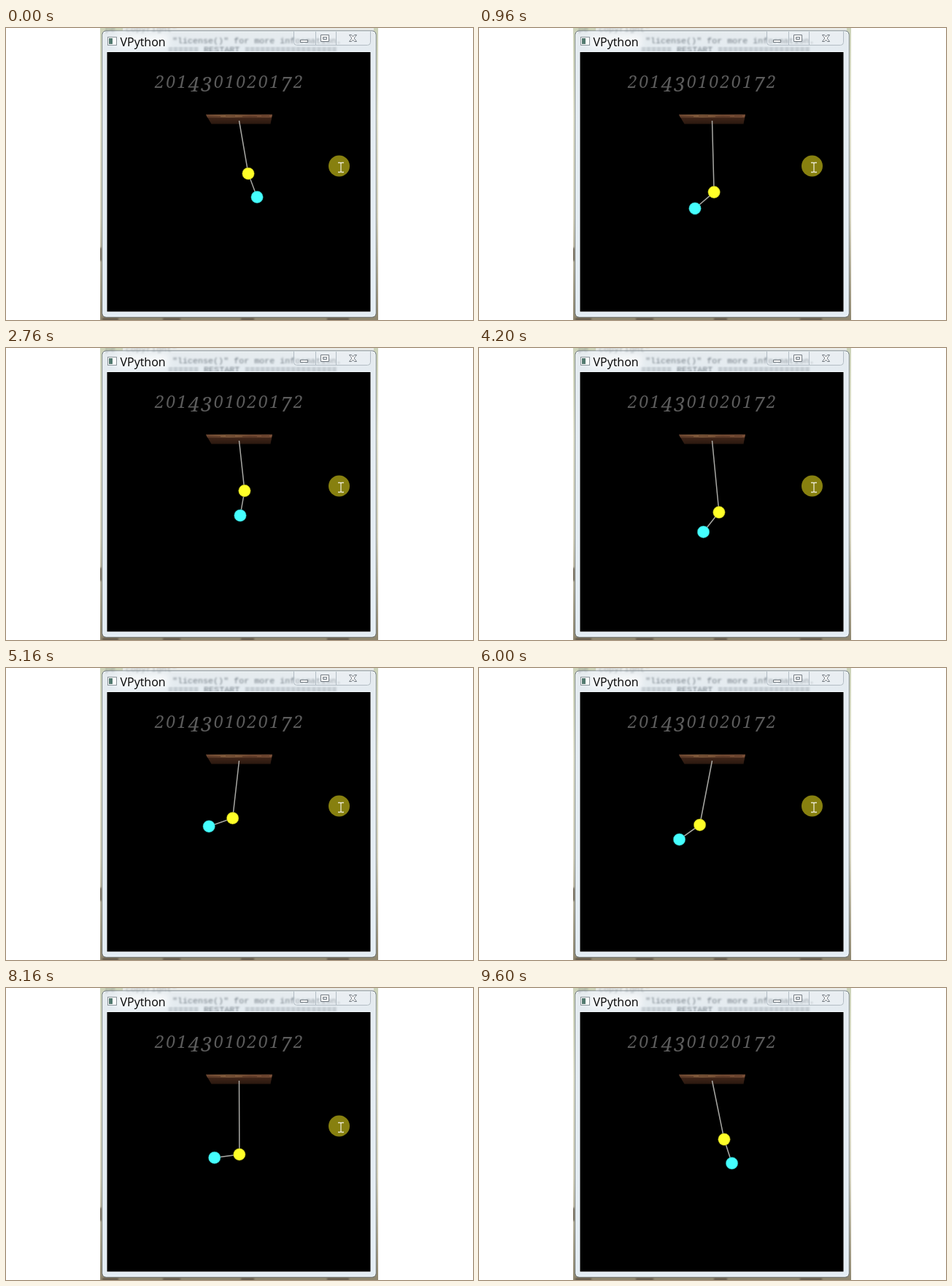
An HTML page that plays this animation: 640 by 400 pixels, repeating every 9.72 s.

```html
<!DOCTYPE html>
<html lang="en">
<head>
<meta charset="utf-8">
<title>Elastic double pendulum</title>
<style>
  html, body { margin: 0; width: 100%; height: 100%; overflow: hidden; background: #fff; }
  svg { display: block; }
  .shell { font: 11.7px "Liberation Mono", monospace; fill: #727c84; filter: url(#blur); }
  .title { font: 16px "Open Sans", sans-serif; }
  .label { font: italic 23px "Noto Serif", serif; letter-spacing: 2.4px; fill: #5c5c5c; }
  .tall { font-size: 27px; }
</style>
</head>
<body>
<svg width="640" height="400" viewBox="0 0 640 400">
  <defs>
    <filter id="blur"><feGaussianBlur stdDeviation="1.1"/></filter>
    <filter id="glow" x="-30%" y="-80%" width="160%" height="260%"><feGaussianBlur stdDeviation="5"/></filter>
    <linearGradient id="desk" x2="0" y2="1">
      <stop offset="0" stop-color="#ccd2b8"/>
      <stop offset=".3" stop-color="#e2e2cf"/>
      <stop offset=".65" stop-color="#d3d1bd"/>
      <stop offset="1" stop-color="#8f8770"/>
    </linearGradient>
    <linearGradient id="frame" x2="0" y2="1">
      <stop offset="0" stop-color="#e6ebee"/>
      <stop offset=".08" stop-color="#e3ebf1"/>
      <stop offset="1" stop-color="#e3edf4"/>
    </linearGradient>
    <linearGradient id="edge" x2="1" y2="0">
      <stop offset="0" stop-color="#6b452f"/>
      <stop offset=".35" stop-color="#86603f"/>
      <stop offset=".65" stop-color="#6e4730"/>
      <stop offset="1" stop-color="#7c5138"/>
    </linearGradient>
    <linearGradient id="under" x2="0" y2="1">
      <stop offset="0" stop-color="#4a2b1d"/>
      <stop offset="1" stop-color="#2a180f"/>
    </linearGradient>
    <clipPath id="scene"><rect x="129" width="381" height="400"/></clipPath>
  </defs>

  <g clip-path="url(#scene)">
    <rect x="129" width="381" height="400" fill="url(#desk)"/>
    <rect x="160" width="344" height="6" fill="#e9ebe8"/>
    <path d="M129 301v18M132 399h22M215 399h24M322 399h18M440 399h30" stroke="#5b5144" stroke-width="3" filter="url(#blur)"/>

    <rect x="132" y="4" width="375" height="392" rx="5" fill="url(#frame)" stroke="#5f6a72"/>
    <rect x="133" y="5" width="373" height="390" rx="4" fill="none" stroke="#f4f9fc"/>
    <text class="shell" x="136" y="5" fill-opacity=".6">pe "copyright"</text>
    <text class="shell" x="228" y="21">"license()" for more information.</text>
    <text class="shell" x="222" y="33">====== RESTART ==================</text>
    <rect x="152" y="9" width="70" height="19" fill="#fff" fill-opacity=".7" filter="url(#glow)"/>

    <rect x="139.5" y="12.5" width="12" height="11" fill="#fff" stroke="#8b949a"/>
    <rect x="141" y="14" width="5" height="8" fill="#52796f"/>
    <text class="title" x="156.5" y="24.5">VPython</text>

    <path d="M394.5 4.5v15q0 4 4 4h97q4 0 4-4v-15M424.5 5v18M452.5 5v18" fill="#f3f7fa" fill-opacity=".25" stroke="#b2bcc4"/>
    <g fill="#fff" stroke="#717980">
      <rect x="403.5" y="16.5" width="10" height="3"/>
      <path d="M431.5 9.5h11v9h-11zM434.5 12.5h5v3h-5z" fill-rule="evenodd"/>
      <path d="M470.5 9.5h3l2 2.5 2-2.5h3l-3.5 4.5 3.5 4.5h-3l-2-2.5-2 2.5h-3l3.5-4.5z"/>
    </g>

    <rect x="138" y="32.5" width="362" height="356.5" fill="#000" stroke="#f1f6f9"/>
    <text class="label" id="label" x="204" y="82"></text>

    <path d="M274 119h91l-2.500 12.500h-81z" fill="url(#under)"/>
    <path d="M274 118.500h91l-1 4h-88z" fill="url(#edge)"/>
    <path d="M276 121.500h18M301 120.500h13M324 121.500h20M350 120.500h11" stroke="#523222" stroke-width=".8"/>

    <polyline id="rods" fill="none" stroke="#a8a8a4" stroke-width="1.5"/>
    <circle id="upper" r="8.3" fill="#ffff28" stroke="#777710" stroke-width=".5"/>
    <circle id="lower" r="8.3" fill="#45ffff" stroke="#187777" stroke-width=".5"/>

    <g id="pointer">
      <circle cx="456.5" cy="189" r="14.5" fill="#87800f"/>
      <path d="M455 184.500h3l1 1 1-1h3M459 185v12M455 197.500h3l1-1 1 1h3" fill="none" stroke="#e8e5cf" stroke-width="1.3"/>
    </g>
  </g>
</svg>
<script>
const LOOP = 9720, STEP = 120;
const POINTER_LEAVES = 9.48;
const PIVOT = { x: 319.5, y: 127 }, ROD = 34.4;

// time (s), spring angle, rod angle (degrees from straight down), spring length
const poses = [
  [0, 9.8, 20.5, 73.5],
  [0.9, 2, -45, 97],
  [1.8, -3.7, -102.5, 100.2],
  [2.76, 6.2, -10, 69],
  [3.4, 9, 25, 84],
  [4.2, 5.5, -38.5, 98.5],
  [5, -5, -70, 79],
  [6, -10.9, -54.5, 89.6],
  [7.1, -6, 15, 78],
  [8.16, 0.2, -82.5, 101],
  [8.9, 7, -35, 88],
  [9.6, 11.6, 17.9, 82]
];

const byId = id => document.getElementById(id);

// Old-style numerals: 0, 1 and 2 stay small, the rest hang below the baseline.
let drop = 0;
byId('label').innerHTML = [...'2014301020172'].map(digit => {
  const tall = digit > '2', dy = (tall ? 5 : 0) - drop;
  drop += dy;
  return `<tspan dy="${dy}"${tall ? ' class="tall"' : ''}>${digit}</tspan>`;
}).join('');

function slope(i, k) {
  const a = poses[Math.max(i - 1, 0)], b = poses[Math.min(i + 1, poses.length - 1)];
  return (b[k] - a[k]) / (b[0] - a[0]);
}

// Cubic Hermite curve through the poses
function valueAt(t, k) {
  let i = 0;
  while (i < poses.length - 2 && t >= poses[i + 1][0]) i++;
  const a = poses[i], b = poses[i + 1], span = b[0] - a[0];
  const u = (t - a[0]) / span, v = 1 - u;
  return v * v * (1 + 2 * u) * a[k] + u * u * (1 + 2 * v) * b[k]
    + u * v * span * (v * slope(i, k) - u * slope(i + 1, k));
}

function hang(from, degrees, length) {
  const angle = degrees * Math.PI / 180;
  return { x: from.x + length * Math.sin(angle), y: from.y + length * Math.cos(angle) };
}

function place(id, p) {
  byId(id).setAttribute('cx', p.x);
  byId(id).setAttribute('cy', p.y);
}

function draw(now) {
  const t = Math.floor(now % LOOP / STEP) * STEP / 1000;
  const upper = hang(PIVOT, valueAt(t, 1), valueAt(t, 3));
  const lower = hang(upper, valueAt(t, 2), ROD);
  byId('rods').setAttribute('points', [PIVOT, upper, lower].map(p => `${p.x},${p.y}`).join(' '));
  place('upper', upper);
  place('lower', lower);
  byId('pointer').setAttribute('visibility', t < POINTER_LEAVES ? 'visible' : 'hidden');
}

const start = performance.now();
function tick() {
  draw(performance.now() - start);
  requestAnimationFrame(tick);
}
tick();
</script>
</body>
</html>
```
